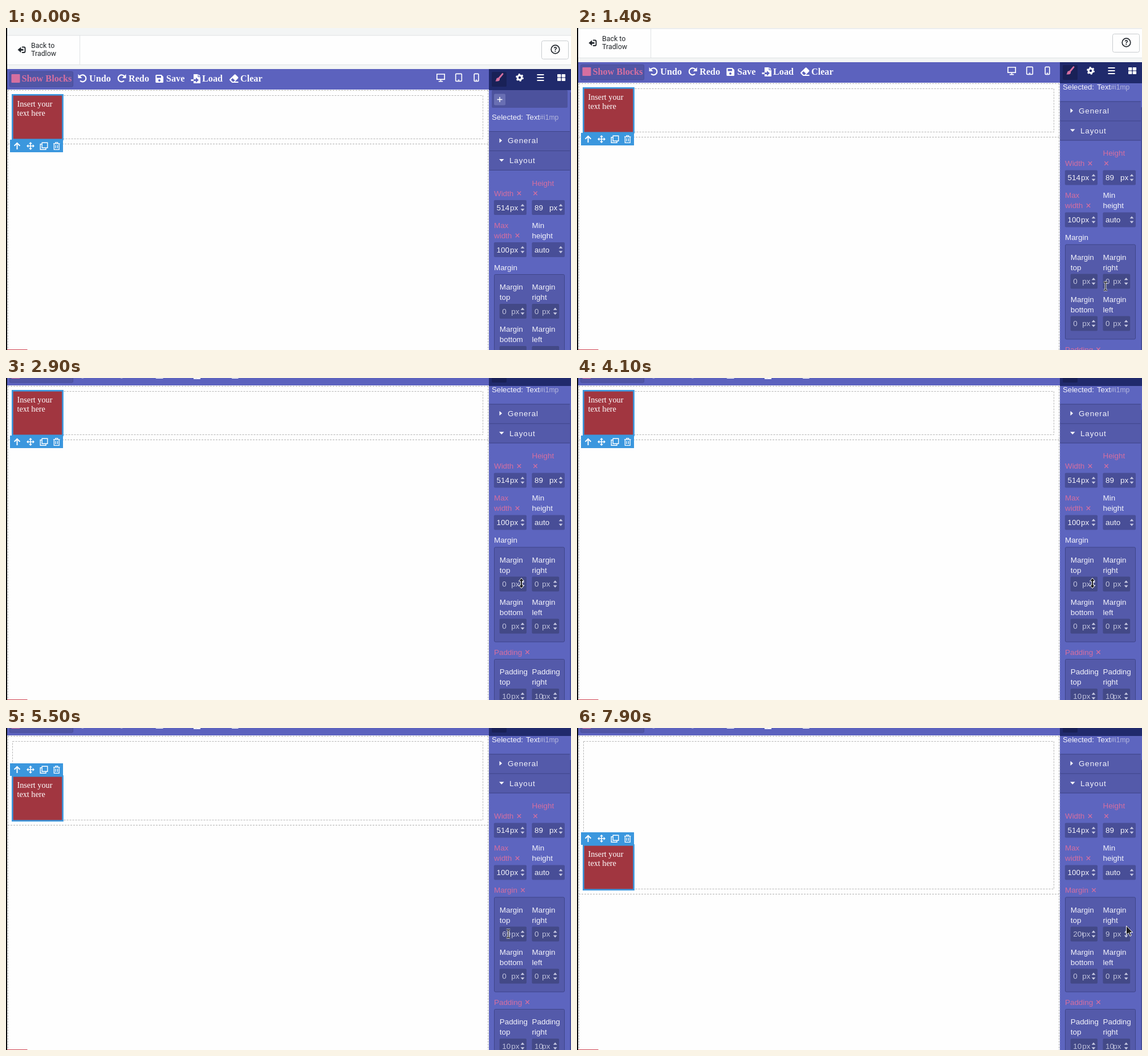
Recreate the animation shown at these times as an HTML page. Size 991 px wide and 565 px high, loop 8000 ms.

```html
<!DOCTYPE html>
<html lang="en">
<head>
<meta charset="utf-8">
<title>Page builder margins</title>
<style>
html, body { margin: 0; width: 100%; height: 100%; overflow: hidden; background: #fefefe; }
svg { display: block; }
text { white-space: pre; }
.sans { font-family: "Liberation Sans", Arial, sans-serif; }
.serif { font-family: "Liberation Serif", "Times New Roman", serif; }
.ui { font-family: Roboto, sans-serif; }
</style>
</head>
<body>
<svg id="stage" width="991" height="565" viewBox="0 0 991 565"></svg>
<script>
const PINK = '#d56fa0', BAR = '#5c62be', PANEL = '#5d65bf', SECTOR = '#545aaa';
const FIELD = '#484e97', INNER_FIELD = '#434987', EDGE = '#3f4589', BLUE = '#3b97de';
const LIGHT = '#f4f4fb', DIM = '#bfc1dc';

const rect = (x, y, w, h, fill, more = '') =>
  `<rect x="${x}" y="${y}" width="${w}" height="${h}" fill="${fill}" ${more}/>`;
const path = (d, fill, more = '') => `<path d="${d}" fill="${fill}" ${more}/>`;
const line = (d, color, width, more = '') =>
  path(d, 'none', `stroke="${color}" stroke-width="${width}" ${more}`);
const text = (x, y, str, size, fill, font = 'sans', more = '') =>
  `<text x="${x}" y="${y}" font-size="${size}" fill="${fill}" class="${font}" ${more}>${str}</text>`;
const group = (attrs, ...parts) => `<g ${attrs}>${parts.join('')}</g>`;

// Small label of the side panel, placed by its middle line
const label = (x, mid, str, fill = LIGHT, more = '') => text(x, mid + 4.8, str, 13.4, fill, 'sans', more);
const cross = (x, mid) => line(`M${x - 3.2} ${mid - 3.2}l6.4 6.4m0 -6.4l-6.4 6.4`, PINK, 1.3);

function field(x, y, w, value, unitX, fill = LIGHT, back = FIELD, id = '') {
  const mid = y + 13, s = x + w - 7;
  return rect(x, y, w, 26, back, 'rx="2"') +
    label(x + 4.7, mid, value, fill, id && `id="${id}" clip-path="url(#valueClip)"`) +
    (unitX ? label(unitX, mid, 'px', fill) : '') +
    path(`M${s - 3.4} ${mid - 2.3}l3.4 -4 3.4 4zM${s - 3.4} ${mid + 2.3}l3.4 4 3.4 -4z`, '#c9cbe4');
}

function header() {
  return rect(0, 0, 991, 72, '#f3f5f5') + rect(0, 13, 991, 51, '#fefefe') +
    line('M0 13H991M0 64.5H991M129.5 13V64', '#dfe2e4', 1) +
    line('M28 33.5H31.5Q33.5 33.5 33.5 35.5V41Q33.5 43 31.5 43H28', '#24292f', 1.9) +
    path('M20.5 38.2L26.3 33.2V36.7H30.5V39.8H26.3V43.2Z', '#24292f') +
    text(44, 35.3, 'Back to', 12.4, '#202428', 'ui') + text(44, 48.6, 'Tradlow', 12.4, '#202428', 'ui') +
    rect(939.5, 22.5, 47, 32, '#fefefe', 'rx="3" stroke="#c8cccf"') +
    '<circle cx="963.5" cy="37.5" r="7.3" fill="none" stroke="#24292f" stroke-width="1.7"/>' +
    text(963.5, 41.7, '?', 12, '#24292f', 'ui', 'text-anchor="middle" font-weight="700"');
}

function toolbar() {
  const undo = line('M129.2 85.2A6 6 0 1 1 130 92.6', '#fff', 2.2) + path('M126.5 81V88H133.5Z', '#fff');
  const word = (x, str, fill = '#f8f8fd') => text(x, 94.3, str, 16.2, fill, 'serif', 'font-weight="700"');
  return rect(0, 72, 847, 36, BAR) +
    rect(6.5, 76.5, 111, 26.5, '#5156a6', 'rx="2" stroke="#484d99"') +
    rect(9.5, 81, 15, 15, PINK, 'rx="1"') + word(27.5, 'Show Blocks', PINK) +
    undo + word(146, 'Undo') +
    group('transform="translate(337 0) scale(-1 1)"', undo) + word(215, 'Redo') +
    path('M264 82H272.5L276 85.5V94.5Q276 96 274.5 96H264Q262.3 96 262.3 94.5V83.5Q262.3 82 264 82Z', '#fff') +
    rect(264.5, 84, 7.5, 3.6, BAR) + '<circle cx="269" cy="92" r="2" fill="' + BAR + '"/>' + word(281, 'Save') +
    path('M329 81H336.5V86H341V97H329V93H333V96L338 91.2 333 87V90H329Z', '#fff') +
    path('M337.6 81L341 85H337.6ZM324.5 90H329V93H324.5Z', '#fff') + word(344, 'Load') +
    path('M392.5 89.5L400.5 81.7Q401.6 80.8 402.7 81.7L407 86Q408 87.2 407 88.3L401.5 94H407.5V96H396.5L392.5 92Q391.4 90.6 392.5 89.5Z', '#fff') +
    path('M394.5 90.8L397.5 88 401.6 92 399.6 94H397.4Z', BAR) + word(411, 'Clear') +
    line('M755.8 81H769.2V90.2H755.8ZM762.5 90V93.5M758.8 93.7H766.2', '#fff', 1.7) +
    rect(788.7, 80.4, 10.6, 13, 'none', 'rx="1.2" stroke="#fff" stroke-width="1.6"') + rect(792.7, 90.6, 2.6, 1.6, '#fff') +
    rect(821.2, 80.4, 7.6, 13, 'none', 'rx="1.2" stroke="#fff" stroke-width="1.6"') + rect(823.7, 90.6, 2.6, 1.6, '#fff');
}

function tabs() {
  const squares = [967, 974.7].map(x => [81, 87.6].map(y => rect(x, y, 6.4, 5.5, '#fff', 'rx=".8"')).join('')).join('');
  return rect(847, 72, 144, 37, '#202a6c') + rect(852, 77, 26, 26, '#192157', 'rx="2"') +
    line('M871 80.6L864.6 88.2', PINK, 3, 'stroke-linecap="round"') +
    path('M862.6 87.3Q866.6 88 866 91.2Q864.6 94.6 858.2 93.2Q859.8 92.2 859.9 89.8Q860.4 87.4 862.6 87.3Z', PINK) +
    '<circle cx="901" cy="87" r="3.8" fill="none" stroke="#fff" stroke-width="3.2"/>' +
    '<circle cx="901" cy="87" r="5.9" fill="none" stroke="#fff" stroke-width="2" stroke-dasharray="2.9 3.28"/>' +
    line('M931.5 82H943.5M931.5 87H943.5M931.5 92H943.5', '#fff', 2) + squares;
}

// Box with four sides, as used for margin and padding
function sides(y, name, values, ids = []) {
  const names = ['top', 'right', 'bottom', 'left'];
  return rect(856.5, y + .5, 123, 166, SECTOR, `rx="2" stroke="${EDGE}"`) + names.map((n, i) => {
    const x = i % 2 ? 922.6 : 865.8, top = y + 74 * (i >> 1);
    return label(x, top + 22.5, name) + label(x, top + 40.5, n) +
      field(x - .2, top + 52, i % 2 ? 47.8 : 47.4, values[i], i % 2 ? 940.3 : 886.3, DIM, INNER_FIELD, ids[i]);
  }).join('');
}

function panel() {
  return rect(852, 109, 133, 31, '#4c529d', 'rx="2"') + rect(856, 115.5, 20, 20, '#696fb3', 'rx="2"') +
    line('M861.5 125.5H870.5M866 121V130', '#fff', 1.4) +
    text(852, 160.6, 'Selected: ', 13.2, LIGHT) + text(912, 160.6, 'Text', 13.2, LIGHT) +
    text(936.3, 160.6, '#i1mp', 12.1, '#b4b7dd') +
    rect(847, 181, 142, 69, SECTOR) +
    line('M847 181.5H989M847 215.5H989M847 249.5H989', EDGE, 1) +
    path('M865.5 193.5L870 197.5 865.5 201.5ZM865 230L873.5 230 869.2 234.5Z', '#fff') +
    label(880, 197.5, 'General', LIGHT, 'letter-spacing=".9"') +
    label(883, 232.3, 'Layout', LIGHT, 'letter-spacing=".9"') +
    label(856, 290, 'Width', PINK) + cross(900, 290) + label(922.5, 272, 'Height', PINK) + cross(928.5, 290) +
    field(855.8, 302, 57.2, '514', 884) + field(922.4, 302, 57.6, '89', 953) +
    label(856, 346, 'Max', PINK) + label(856, 364, 'width', PINK) + cross(897, 364) +
    label(922.5, 346, 'Min') + label(922.5, 364, 'height') +
    field(855.8, 376, 57.2, '100', 884) + field(922.4, 376, 57.6, 'auto') +
    label(856, 420, 'Margin', LIGHT, 'id="marginLabel"') + group('id="marginCross"', cross(906.5, 420)) +
    sides(432, 'Margin', ['0', '0', '0', '0'], ['topValue', 'rightValue']) +
    line('M886 489.5V505', '#e4e5f2', 1, 'id="caret"') +
    label(856, 616.5, 'Padding', PINK) + cross(914.5, 616.5) +
    sides(628.5, 'Padding', ['10', '10', '10', '10']);
}

function page() {
  const dash = 'stroke-dasharray="3 2"';
  return rect(0, 108, 847, 600, '#fefefe') +
    line('M3 109.5H846M3.5 109V700M845.5 109V700', '#b2b2b2', 1, dash) +
    line('M3 203.5H846', '#b2b2b2', 1, dash + ' id="outerEnd"') +
    rect(11.5, 118.5, 825, 76, 'none', `id="inner" stroke="#b4b4b4" ${dash}`) +
    group('id="block"', rect(11.3, 117.3, 88.2, 78.5, '#a13640', `stroke="${BLUE}" stroke-width="2.65"`),
      text(19.5, 138, 'Insert your', 14.2, '#fff', 'serif'), text(19.5, 154, 'text here', 14.2, '#fff', 'serif')) +
    group('id="tools"', rect(7, 0, 93, 22, BLUE),
      line('M19.5 17V6M14.6 10.8L19.5 5.9 24.4 10.8', '#fff', 2),
      line('M37.5 11H48.5M43 5.5V16.5', '#fff', 1.6),
      path('M43 4L46 7.2H40ZM43 18L46 14.8H40ZM36 11L39.2 8V14ZM50 11L46.8 8V14Z', '#fff'),
      line('M63.2 5.2H72.8V14.3H63.2ZM63 7.8H60.2V17.2H70V14.6', '#fff', 1.4),
      line('M83 6.8H94.5M86.8 6.4V4.8H90.7V6.4M84.3 7V17.3H93.2V7M87 9.4V15M90.4 9.4V15', '#fff', 1.3));
}

function toast() {
  return group('id="toast"', rect(10, 4.5, 185, 40.5, '#fefefe', 'rx="3" filter="url(#shadow)"'),
    '<circle cx="31" cy="24" r="12.8" fill="none" stroke="#e3eadd" stroke-width="2.6"/>',
    line('M24.5 25L29 29.3 38 19.8', '#a5dc86', 2.4, 'id="check" pathLength="1" stroke-dasharray="1 2"'),
    text(51, 28.5, 'Changes have been saved', 11.15, '#484848', 'ui', 'font-weight="700"'),
    rect(10, 42.6, 185, 2.2, '#c6c6c6', 'id="timer"'));
}

const beam = 'M-3.2 -7H-1L0 -6 1 -7H3.2M0 -6V6M-3.2 7H-1L0 6 1 7H3.2';
const cursors = {
  a: path('M0 0V16L3.8 12.6 6.4 18.3 8.8 17.2 6.4 11.7H11.2Z', '#1b1b1f', 'stroke="#fff" stroke-width="1"'),
  i: line(beam, '#fff', 3) + line(beam, '#1b1b1f', 1.3),
  r: path('M0 -9L4.6 -3.5H1.6V3.5H4.6L0 9 -4.6 3.5H-1.6V-3.5H-4.6Z', '#1b1b1f', 'stroke="#fff" stroke-width="1"')
};

document.getElementById('stage').innerHTML =
  `<defs><clipPath id="panelClip"><rect x="847" y="109" width="144" height="700"/></clipPath>
   <clipPath id="valueClip"><rect x="866" y="480" width="21.6" height="40"/><rect x="922" y="480" width="30" height="40"/></clipPath>
   <filter id="shadow" x="-10%" y="-40%" width="120%" height="180%"><feDropShadow dx="0" dy="0" stdDeviation="3.5" flood-color="#888" flood-opacity=".6"/></filter></defs>` +
  group('id="scroller"', header(), toolbar(), page(),
    rect(847, 109, 144, 700, PANEL), group('clip-path="url(#panelClip)"', group('id="panel"', panel())),
    rect(989.3, 113, 1.7, 700, '#454b93', 'id="thumb"'), tabs()) +
  rect(0, 0, 2, 565, '#08080a') + rect(2, 564, 35.5, 1, '#cf3f4f') +
  toast() + Object.keys(cursors).map(k => group(`class="cursor" data-kind="${k}"`, cursors[k])).join('');

// Rows: start time, then the state held from there on
const pageScroll = [[0, 0], [1400, 12], [1500, 62], [1600, 92], [1700, 95]];
const panelScroll = [[0, 0], [1000, 9], [1100, 22], [1200, 33], [1300, 39], [1400, 40.5]];
const blockShift = [[0, 0], [4900, 62], [6000, 183]];
const topValue = [[0, '0'], [4600, '6'], [4800, '69'], [5800, '2'], [5900, '20'], [6000, '206']];
const pointer = [[0], [500, 970, 507, 'a'], [600, 947, 482, 'a'], [900, 936, 466, 'a'], [1000, 929, 456, 'i'],
  [1100, 927, 453, 'i'], [1600, 926, 454, 'i'], [1700, 926, 443, 'i'], [1800, 921, 392, 'a'], [1900, 920, 357, 'a'],
  [2100, 911, 352, 'a'], [2200, 903, 357, 'a'], [2500, 904, 362, 'r'], [2800, 905, 355, 'a'], [2900, 904, 360, 'r'],
  [3200, 903, 357, 'r'], [3500, 904, 360, 'r'], [3900, 903, 357, 'r'], [4000, 905, 352, 'a'], [4100, 904, 360, 'r'],
  [4900, 907, 325, 'a'], [5000, 910.5, 289.5, 'a'], [5100, 910, 306, 'a'], [5200, 904, 333, 'a'], [5300, 893, 352, 'a'],
  [5400, 884, 361, 'i'], [5500, 881, 361, 'i'], [6200, 922, 300, 'a'], [6300, 936.5, 270, 'a'], [6500, 940, 285, 'a'],
  [6600, 944, 312, 'a'], [6700, 949, 337, 'a'], [6800, 953, 350, 'a'], [6900, 955, 353, 'a'], [7000, 959, 360, 'i'],
  [7100, 962, 361, 'r'], [7200, 963.5, 360, 'r'], [7900, 963.5, 347, 'a']];
const toastIn = [[0, -9, 2], [.33, 0, -2], [.66, 4.4, 2], [1, 0, 0]];

const el = id => document.getElementById(id);
const hold = (rows, t) => rows.filter(r => r[0] <= t).pop();
const put = (node, x, y) => node.setAttribute('transform', `translate(${x} ${y})`);
const show = (node, on) => node.setAttribute('visibility', on ? 'visible' : 'hidden');
const clamp = v => Math.min(1, Math.max(0, v));
const marks = [...document.querySelectorAll('.cursor')];

function drawToast(t) {
  const on = t >= 6200 && t < 7300;
  el('toast').setAttribute('display', on ? 'inline' : 'none');
  show(el('check'), on && t > 6500);
  if (!on) return;
  const p = clamp((t - 6145) / 500);
  const k = Math.min(2, toastIn.filter(r => r[0] <= p).length - 1);
  const [a, b] = [toastIn[k], toastIn[k + 1]];
  const f = (p - a[0]) / (b[0] - a[0]), mix = i => a[i] + (b[i] - a[i]) * f;
  el('toast').setAttribute('transform', `translate(0 ${mix(1)}) rotate(${mix(2)} 102.5 24)`);
  el('timer').setAttribute('width', 185 * clamp(1 - (t - 6215) / 1085));
  el('check').setAttribute('stroke-dasharray', `${clamp((t - 6500) / 250)} 2`);
}

function draw(t) {
  const scroll = hold(panelScroll, t)[1], shift = hold(blockShift, t)[1];
  put(el('scroller'), 0, -hold(pageScroll, t)[1]);
  put(el('panel'), 0, -scroll);
  put(el('thumb'), 0, scroll * .94);
  put(el('block'), 0, shift);
  put(el('tools'), 0, shift ? 95 + shift : 196);
  put(el('outerEnd'), 0, shift);
  el('inner').setAttribute('height', 76 + shift);

  el('topValue').textContent = hold(topValue, t)[1];
  el('rightValue').textContent = t < 7900 ? '0' : '9';
  show(el('caret'), t >= 4800 && t < 5400);
  el('marginLabel').setAttribute('fill', t < 5100 ? LIGHT : PINK);
  show(el('marginCross'), t >= 5100);

  const [, x, y, kind] = hold(pointer, t);
  for (const m of marks) {
    show(m, m.dataset.kind === kind);
    put(m, x || 0, y || 0);
  }
  drawToast(t);
}

const start = performance.now();
function tick() {
  const t = Math.max(0, performance.now() - start) % 8000;
  draw(Math.floor(t / 100) * 100);
  requestAnimationFrame(tick);
}
tick();
</script>
</body>
</html>
```
